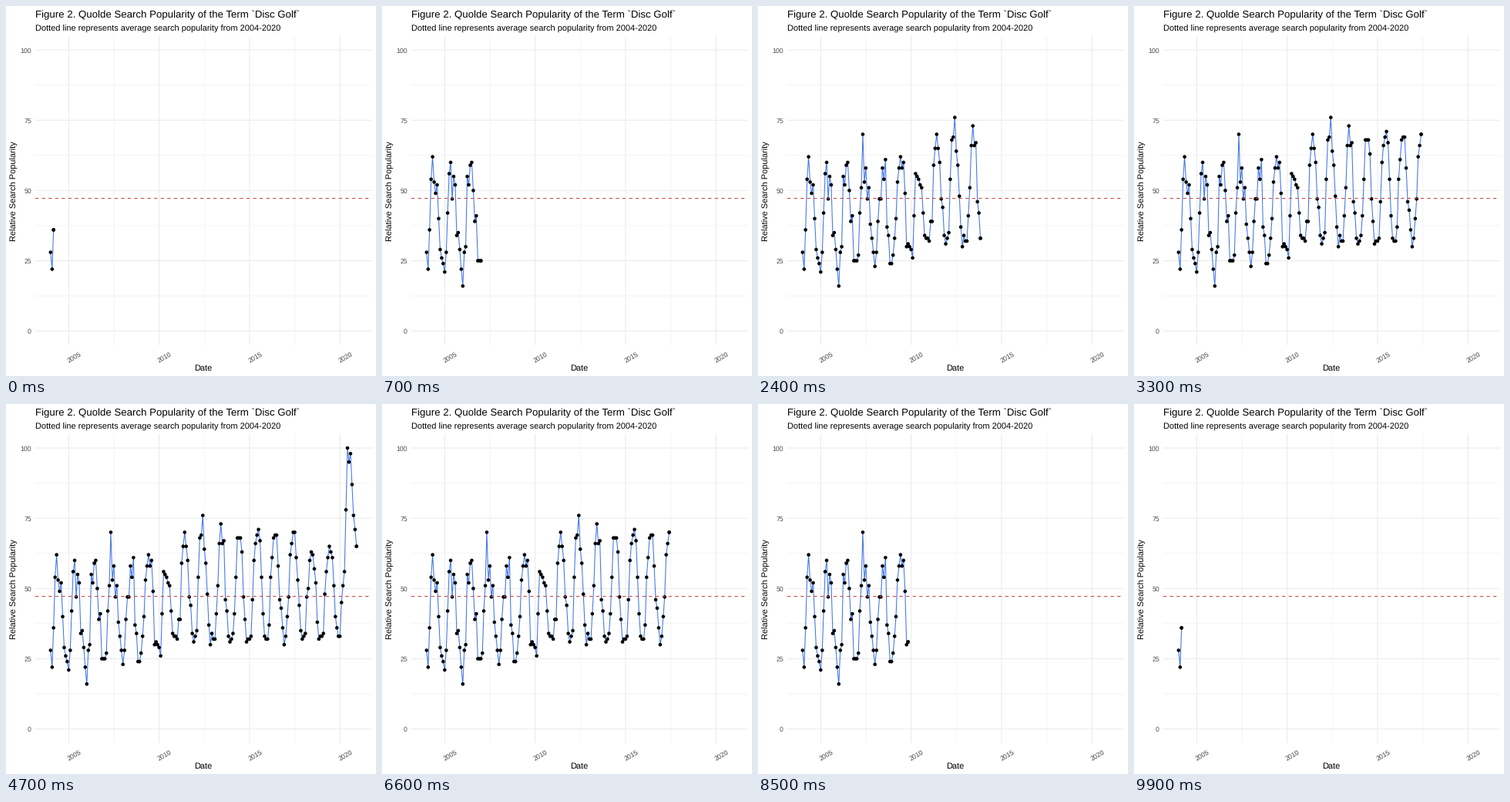
Animation of 480 by 480 pixels, one loop 10 s. Source, as a matplotlib script:

```python
import numpy as np
import matplotlib.pyplot as plt
from matplotlib.animation import FuncAnimation

SIZE, FRAMES, REVEAL = 480, 100, 42
MEAN = 47.2
plt.rcParams.update({
    "font.family": "Liberation Sans",
    "text.hinting": "no_hinting",
    "path.snap": False,
})

# Monthly popularity, one row per year; gaps lie on the line between neighbours.
_ = np.nan
YEARS = [
    [28, 22, 36, 54, 62, 53, 49, 52, _, 29, _, _],
    [21, 28, _, 56, 60, 47, 55, 52, 34, 35, _, _],
    [16, 28, 30, 55, 52, 59, 60, _, 39, 41, 25, _],
    [25, 27, 42, 51, 70, 53, 58, 47, 51, 38, _, _],
    [23, 28, 39, 47, 47, 58, 54, 61, 37, 34, 24, 24],
    [27, _, 40, 53, _, 62, 58, 60, 49, 30, 31, _],
    [29, 26, 41, 56, _, _, _, 51, _, 34, _, _],
    [32, 39, 39, 59, _, 70, _, 60, 47, 44, 34, 31],
    [_, 35, 54, 68, 69, 76, 64, 59, _, 37, 30, 34],
    [32, 32, _, 51, 66, 73, 66, 67, 46, 42, 33, 31],
    [_, 34, 41, 54, 68, _, 68, 63, 47, _, 31, _],
    [_, 33, _, 60, 66, _, 71, 67, _, 41, 33, _],
    [32, 37, 54, _, 68, _, 69, _, 46, 43, _, 30],
    [33, _, 47, 62, _, 70, 70, _, _, _, 35, 32],
    [_, 34, 47, 50, 60, 63, 62, _, 52, 38, 32, _],
    [_, 34, 48, 56, _, 65, _, 61, _, 40, _, 33],
    [33, 45, _, 56, _, 100, 95, 98, _, 76, _, 65],
]
raw = np.ravel(YEARS)
month = np.arange(raw.size)
known = ~np.isnan(raw)
value = np.interp(month, month[known], raw[known])
# Whole numbers, with halves rounded away from the average.
value = np.where(value > MEAN, np.floor(value + 0.5), np.ceil(value - 0.5))

START = np.datetime64("2004-01-01")
day = ((np.datetime64("2004-01") + month).astype("datetime64[D]") - START).astype(int)
step = np.round(day / day[-1] * REVEAL)

LEFT, RIGHT, TOP, BOTTOM = 38, 474.6, 38.8, 439.8


def px(d):
    return 57.85 + 396.9 * d / day[-1]


def py(v):
    return 421.6 - 3.645 * v


def year_x(year):
    """Pixel position of 1 January; halves fall midway between years."""
    return px((year - 2004) * 365.25 + 0.75)


fig = plt.figure(figsize=(SIZE / 72, SIZE / 72), dpi=72, facecolor="white")
ax = fig.add_axes([0, 0, 1, 1])
ax.set(xlim=(0, SIZE), ylim=(SIZE, 0))
ax.axis("off")


def grid_x(x, lw):
    ax.plot([x, x], [TOP, BOTTOM], color="#ebebeb", lw=lw, solid_capstyle="butt")


def grid_y(y, lw):
    ax.plot([LEFT, RIGHT], [y, y], color="#ebebeb", lw=lw, solid_capstyle="butt")


def label(x, y, s, size, color="black", **kw):
    kw = {"va": "baseline", "rotation_mode": "anchor", **kw}
    ax.text(x, y, s, size=size, color=color, **kw)


for v in (12.5, 37.5, 62.5, 87.5):
    grid_y(py(v), 0.53)
for year in (2007.5, 2012.5, 2017.5):
    grid_x(year_x(year), 0.53)
for v in range(0, 101, 25):
    grid_y(py(v), 1.07)
    label(33, py(v) + 3.8, str(v), 8.8, "#4d4d4d", ha="right")
for year in range(2005, 2021, 5):
    x = year_x(year)
    grid_x(x, 1.07)
    label(x + 7.4, 455.7, str(year), 8.8, "#4d4d4d",
          ha="center", va="center", rotation=30)

label(LEFT, 15, "Figure 2. Quolde Search Popularity of the Term `Disc Golf`", 13.2)
label(LEFT, 32.7, "Dotted line represents average search popularity from 2004-2020", 11)
label(255.5, 473, "Date", 11, ha="center")
label(14.2, 239.8, "Relative Search Popularity", 11, ha="center", rotation=90)

line, = ax.plot([], [], color="#4477e8", lw=1.07)
dots = ax.scatter([], [], color="black", linewidths=0, zorder=2)
ax.plot([LEFT, RIGHT], [py(MEAN)] * 2, color="#cd4444", lw=1.07, ls=(0, (4, 4)))


def draw(i):
    shown = step <= min(i, FRAMES - 1 - i)  # reveal, hold, rewind
    pts = np.column_stack([px(day[shown]), py(value[shown])])
    line.set_data(*pts.T)
    pts = np.vstack([pts, pts[-1:]])  # the newest dot is drawn twice
    dots.set_offsets(pts)
    dots.set_sizes(np.full(len(pts), 4.6 ** 2))
    return line, dots


anim = FuncAnimation(fig, draw, frames=FRAMES, interval=100,
                     init_func=lambda: draw(0), repeat=True, repeat_delay=0)
plt.show()
```
